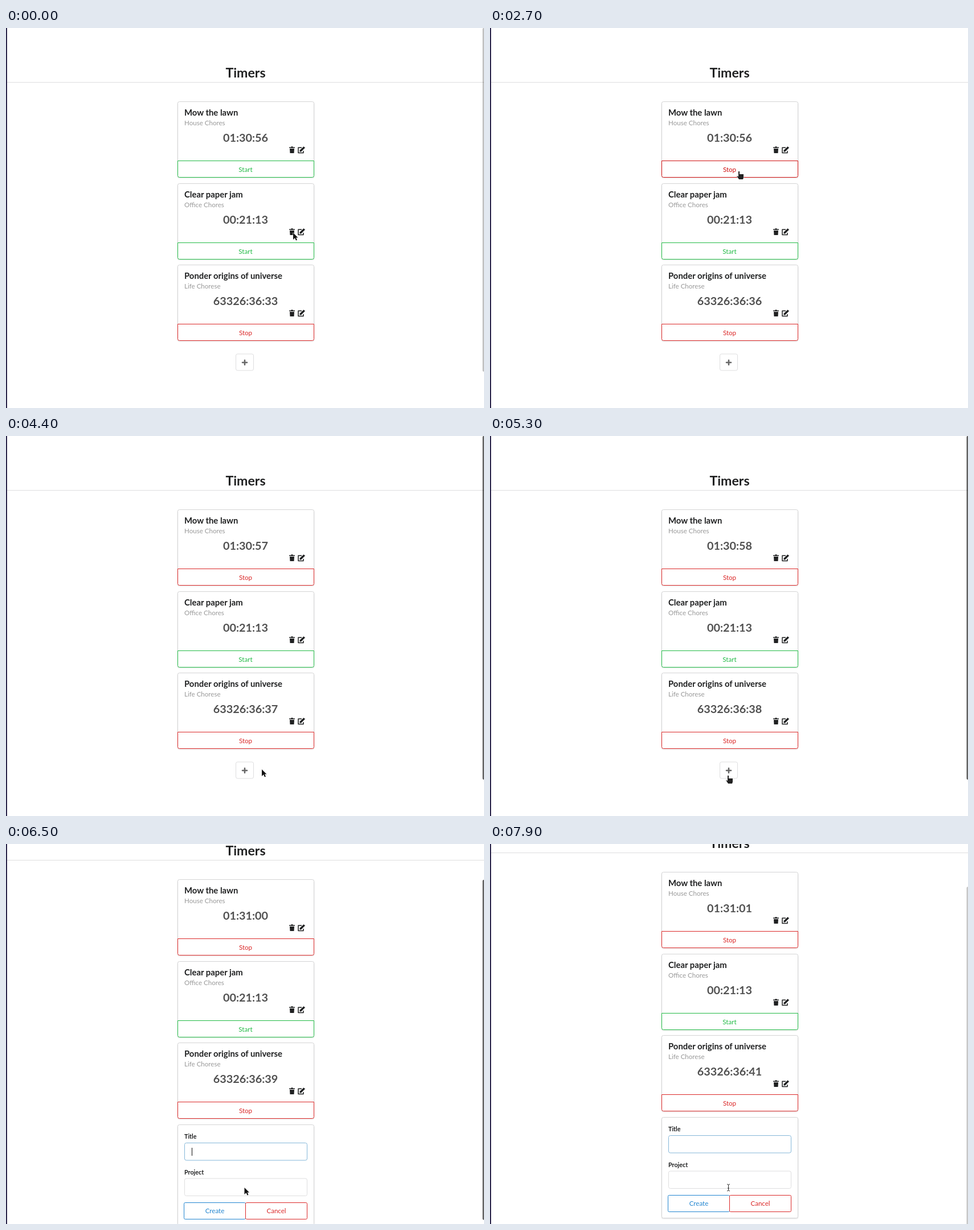
An HTML page for the animation above (8000 ms loop, 839x668 px).

```html
<!DOCTYPE html>
<html lang="en">
<head>
<meta charset="utf-8">
<title>Timers</title>
<style>
  html, body { margin: 0; width: 839px; height: 668px; overflow: hidden; background: #fff; }
  svg { display: block; }
  text { font: 11.57px Lato, sans-serif; fill: #1f2021; }
  .title { font-size: 23.13px; font-weight: 700; }
  .name { font-size: 14.87px; font-weight: 700; }
  .project { fill: #999; }
  .clock { font-size: 19.83px; font-weight: 700; fill: #515151; }
  .label { font-size: 10.74px; font-weight: 700; }
  .mid { text-anchor: middle; }
  .card { fill: #fff; stroke: #d4d4d5; }
  .shadow { fill: none; stroke: #ececec; stroke-width: 2; }
  .field { fill: #fff; stroke: #dededf; }
  .focus { stroke: #85b7d9; }
</style>
</head>
<body>
<svg id="stage" width="839" height="668"></svg>
<script>
const LOOP = 8000, STEP = 100, PITCH = 143.67, CENTER = 420.5, SCROLL_END = 80;
const INK = '#1f2021', BLUE = '#2185d0';
const GREEN = { base: '#21ba45', hover: '#16ab39' };
const RED = { base: '#db2828', hover: '#cf1010' };

const ramp = (t, from, to) => Math.min(1, Math.max(0, (t - from) / (to - from)));
const smooth = u => u * u * (3 - 2 * u);

// Each move starts where the last one ended; bulge bows the path to the right.
const MOVES = [
  { from: 400, to: 1200, x: 437, y: 252, bulge: 10 },
  { from: 3400, to: 4400, x: 449, y: 586, bulge: 58 },
  { from: 4400, to: 4700, x: 418, y: 597, bulge: 0 },
  { from: 5800, to: 6000, x: 418.5, y: 604, bulge: 0 }
];

function pointerAt(t) {
  let x = 504, y = 360;
  for (const move of MOVES) {
    const p = smooth(ramp(t, move.from, move.to));
    x += (move.x - x) * p + move.bulge * Math.sin(Math.PI * p);
    y += (move.y - y) * p;
  }
  return { x, y };
}

const scrollAt = t => Math.round(SCROLL_END * (1 - (1 - ramp(t, 6300, 6600)) ** 1.65));

const thumbOpacity = t => t < 2600
  ? .25 * (1 - ramp(t, 2300, 2500))
  : .62 * ramp(t, 2700, 2900) - .4 * ramp(t, 7400, 7900);

const text = (x, y, cls, s, style = '') => `<text x="${x}" y="${y}" class="${cls}" style="${style}">${s}</text>`;
const rect = (x, y, w, h, attrs, r = 3) =>
  `<rect x="${x}" y="${y}" width="${w}" height="${h}" rx="${r}" ${attrs}/>`;
const panel = (y, h) =>
  rect(301.5, y + 1.5, 239, h, 'class="shadow"') + rect(301.5, y + .5, 239, h, 'class="card"');

const clock = s => [s / 3600, s / 60 % 60, s % 60]
  .map(n => String(Math.floor(n)).padStart(2, '0')).join(':');

const icons = y => `<g transform="translate(497 ${y})" fill="${INK}">
  <path d="M0 1.5H3L4 .2H6L7 1.5H10V3H0ZM1 4H9L8.5 12H1.5Z"/>
  <path d="M22 2.2H16V11.4H25V8" fill="none" stroke="${INK}" stroke-width="1.5" stroke-linejoin="round"/>
  <path d="M18.5 9.5V7L25.5 .2 28 2.500 21 9.5Z"/></g>`.replace('2.500', '2.5');

function timerCard(i, name, project, seconds, running, hovered) {
  const y = Math.round(129 + i * PITCH);
  const color = (running ? RED : GREEN)[hovered ? 'hover' : 'base'];
  return panel(y, 133) +
    text(313, y + 25, 'name', name) +
    text(313, y + 42, 'project', project) +
    text(CENTER, y + 71, 'clock mid', clock(seconds)) +
    icons(y + 79) +
    `<path d="M301.5 ${y + 104.5}h239v26q0 3-3 3h-233q-3 0-3-3z" fill="#fff" stroke="${color}"/>` +
    text(CENTER, y + 123.5, 'mid', running ? 'Stop' : 'Start', `fill:${color}`);
}

const formButton = (x, label, color) =>
  rect(x, 697.5, 108, 29, `fill="none" stroke="${color}"`, 2) +
  text(x + 54, 716, 'mid', label, `fill:${color}`);

const form = (focused, caret) => panel(560, 177) +
  text(313, 585, 'label', 'Title') +
  rect(313.5, 592.5, 215, 30.5, `class="field ${focused ? 'focus' : ''}"`) +
  (caret ? '<path d="M326.5 601v14" stroke="#111"/>' : '') +
  text(313, 647.5, 'label', 'Project') +
  rect(313.5, 655, 215, 30.5, 'class="field"') +
  formButton(312.5, 'Create', BLUE) + formButton(420.5, 'Cancel', RED.base);

const addButton = () => rect(403.5, 573, 31, 29, 'class="field"') +
  '<path d="M415 588H423M419 584V592" stroke="#686868" stroke-width="2.6" stroke-linecap="round"/>';

const OUTLINE = 'stroke="#fff" stroke-linejoin="round" paint-order="stroke"';
const CURSORS = {
  arrow: `<path d="M0 0V12L3 9 5 13.5 7 12.500 5 8.5H8.5Z" fill="#111" ${OUTLINE}/>`.replace('12.500', '12.5'),
  hand: `<path d="M-1 0H1V5H8V11L7 14H0L-4 8-1 9Z" fill="#222" ${OUTLINE}/>`,
  beam: '<path d="M-2.5-6Q0-6 0-4V4Q0 6-2.5 6M2.5-6Q0-6 0-4V4Q0 6 2.5 6M-1.5 1H1.5" fill="none" stroke="#333"/>'
};

function render(t) {
  const { x, y } = pointerAt(t), scroll = scrollAt(t);
  const formOpen = t >= 5400, scrolling = scroll > 0 && scroll < SCROLL_END;
  const over = (cx, cy, w, h) => !formOpen && Math.abs(x - cx) < w / 2 && Math.abs(y - cy) < h / 2;
  const hovers = i => over(CENTER, 248 + i * PITCH, 239, 30);
  const onButton = [0, 1, 2].some(hovers) || over(419, 588, 31, 29);
  const cursor = onButton ? 'hand' : formOpen && !scrolling ? 'beam' : 'arrow';

  const lawn = 5456 + Math.max(0, Math.floor((t - 2500) / 1000));
  const universe = 63326 * 3600 + 36 * 60 + 33 + Math.floor((t + 400) / 1000);
  const thumbHeight = formOpen ? 591 : 604;

  return `<g transform="translate(0 ${-scroll})">
      ${text(CENTER, 86.5, 'title mid', 'Timers')}
      <path d="M2 95.5H839" stroke="#dededf"/>
      ${timerCard(0, 'Mow the lawn', 'House Chores', lawn, t >= 2700, hovers(0))}
      ${timerCard(1, 'Clear paper jam', 'Office Chores', 1273, false, hovers(1))}
      ${timerCard(2, 'Ponder origins of universe', 'Life Chorese', universe, true, hovers(2))}
      ${formOpen ? form(t >= 5900, t >= 6000 && t < 7200) : addButton()}
    </g>
    <rect width="1.8" height="668" fill="#17113a"/>
    ${rect(836.5, scroll * .94, 5, thumbHeight + scroll * .1, `opacity="${thumbOpacity(t)}"`, 2)}
    <g transform="translate(${x} ${y})">${CURSORS[cursor]}</g>`;
}

const stage = document.getElementById('stage');
let shown = -1;
function frame() {
  const t = Math.floor(performance.now() % LOOP / STEP) * STEP;
  if (t !== shown) stage.innerHTML = render(shown = t);
  requestAnimationFrame(frame);
}
frame();
</script>
</body>
</html>
```
